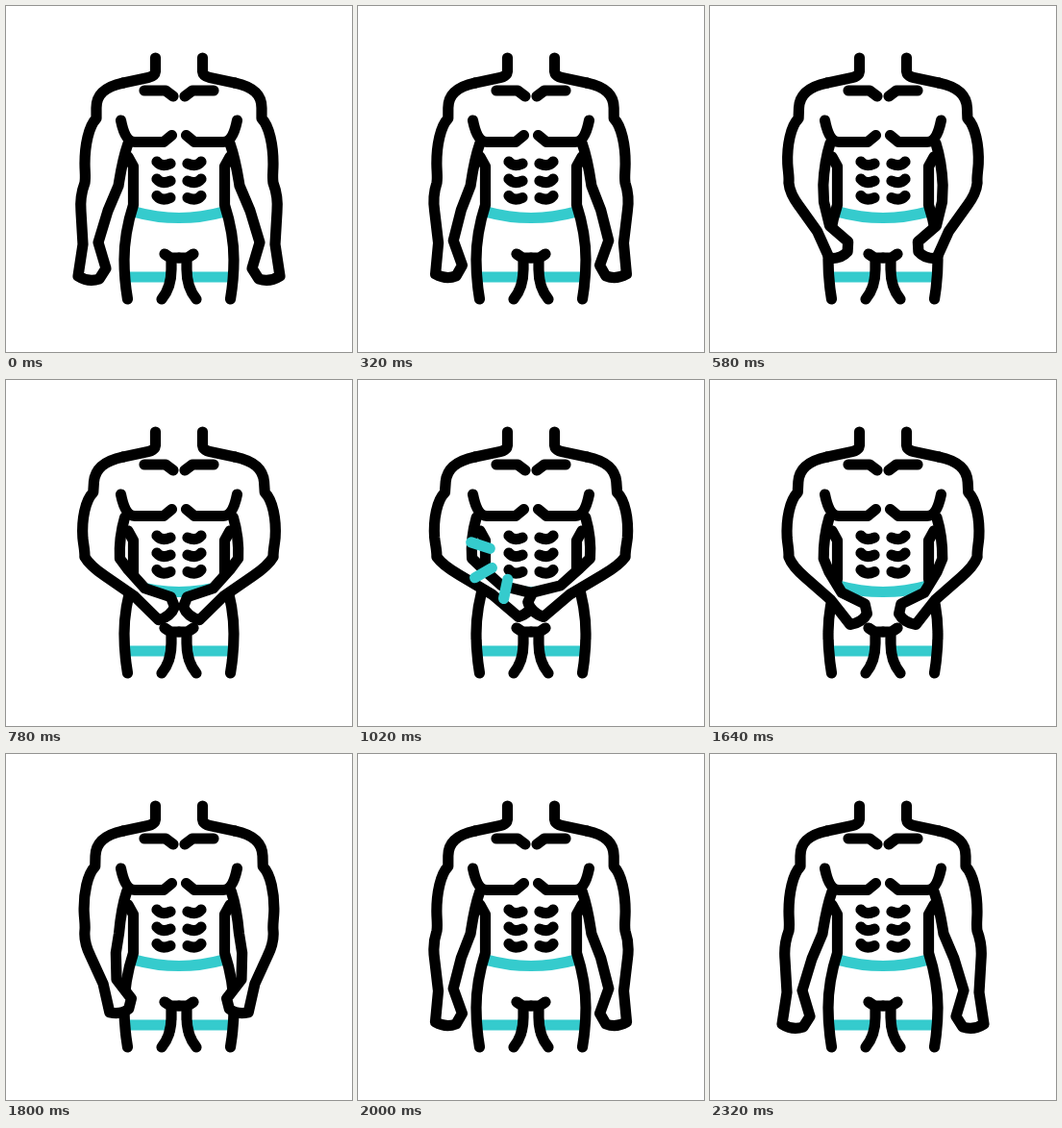
An HTML page for the animation above (2.4 s loop, 360 px wide and 360 px high).

```html
<!DOCTYPE html>
<html lang="en">
<head>
<meta charset="utf-8">
<style>
  html, body { margin: 0; width: 100%; height: 100%; overflow: hidden; background: #fff; }
  svg { display: block; width: 100%; height: 100%; }
  path { fill: none; stroke: #000; stroke-width: 11.2; stroke-linecap: round; stroke-linejoin: round; }
  .teal { stroke: #35cbcd; }
  .flat { stroke-linecap: butt; }
  #arm { fill: #fff; }
</style>
</head>
<body>
<svg viewBox="0 0 360 360">
  <path class="teal flat" d="M133 214Q180 227 227 214M128 282H168M192 282H232"/>
  <g id="torso">
    <path d="M127 157L132.500 167V207C127 224 123 244 123 264Q123 284 126.500 305"/>
    <path id="abs"/>
  </g>
  <use href="#torso" transform="matrix(-1 0 0 1 360 0)"/>
  <path id="arm" d="M122,80C103,84 94,92 94,106L94,117C86,125 82,145 82,164C82,172 83,178 82,184
    C79,192 77,203 78,214L80,248L75,281Q86,288 97,284L104,273L96,246L106,213L117,187C119,175 121,160 127,143"/>
  <use href="#arm" transform="matrix(-1 0 0 1 360 0)"/>
  <g id="front">
    <path d="M155.500 54V68Q155 73 148 74.500L122 80"/>
    <path d="M144 88H166L174 94"/>
    <path d="M119.500 119Q124 141.500 134 141.500H164L172.500 134.500"/>
    <path d="M165 258L171 262H180M172 264V274Q172 293 162 305"/>
  </g>
  <use href="#front" transform="matrix(-1 0 0 1 360 0)"/>
  <path class="teal" id="rays"/>
</svg>
<script>
const LOOP = 2400, PEAK = 1160, START = 20, MOVE = 1100;
const byId = id => document.getElementById(id);
const setPath = (id, d) => byId(id).setAttribute('d', d);
const clamp = x => Math.min(1, Math.max(0, x));
const ease = p => p < .5 ? (2 * p) ** 3.5 / 2 : 1 - (2 - 2 * p) ** 3.5 / 2;

setPath('abs', [162, 180, 197.5].map(y => `M157 ${y}q5 6 14 2`).join(''));
const restingArm = byId('arm').getAttribute('d');

// The shoulder flexes outward; below the elbow the forearm swings in and up.
function bend(x, y, k) {
  const flex = 4 * Math.sin(Math.PI * clamp((y - 80) / 105));
  const below = Math.max(0, y - 185), across = x - 75;
  const dx = below * (.96 - .004 * across) - flex;
  const dy = -below * (.36 + .008 * across);
  return `${(x + k * dx).toFixed(2)},${(y + k * dy).toFixed(2)}`;
}

function ray(degrees, length) {
  const angle = degrees * Math.PI / 180, inner = 25;
  const at = r => `${161 + r * Math.cos(angle)} ${183 + r * Math.sin(angle)}`;
  return `M${at(inner)}L${at(inner + length)}`;
}

function draw(now) {
  const t = PEAK - Math.abs(now % LOOP - PEAK);
  const k = ease(clamp((t - START) / MOVE));
  setPath('arm', restingArm.replace(/(\d+),(\d+)/g, (_, x, y) => bend(+x, +y, k)));
  const grow = clamp((t - 860) / 130);
  setPath('rays', grow ? [198, 150, 102].map(a => ray(a, 20.5 * grow)).join('') : '');
}

const begin = performance.now();
function tick() {
  draw(performance.now() - begin);
  requestAnimationFrame(tick);
}
tick();
</script>
</body>
</html>
```
